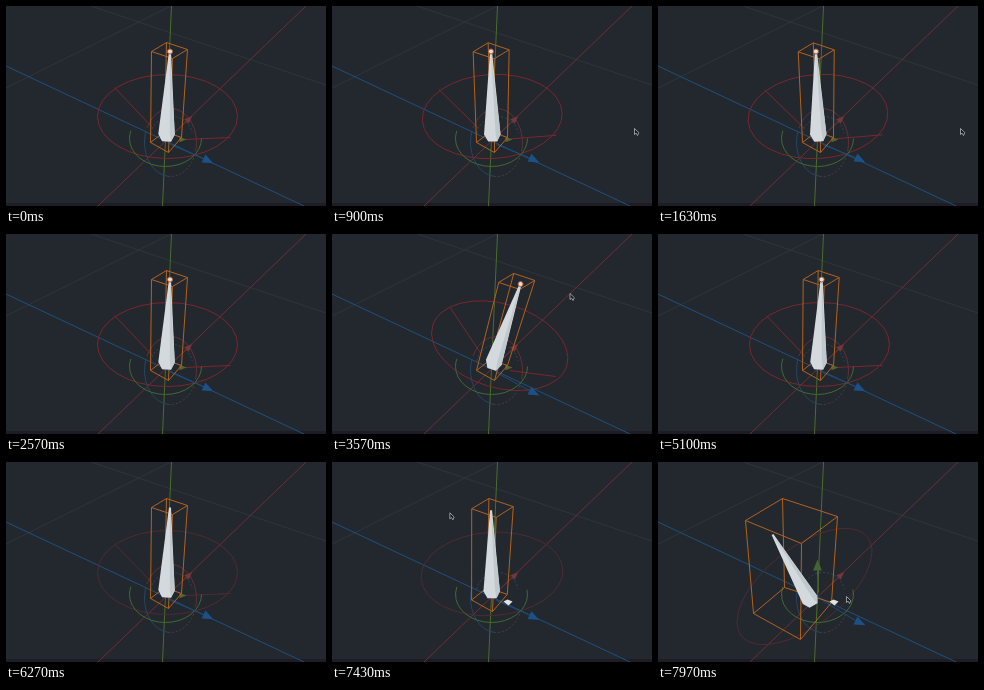
An HTML page with a canvas that plays this animation: 320 by 200 pixels, repeating every 8000 ms.

```html
<!DOCTYPE html>
<html>
<head>
<meta charset="utf-8">
<style>
html, body { margin: 0; width: 100%; height: 100%; overflow: hidden; background: #22282e; }
canvas { display: block; width: 100vw; height: 100vh; }
</style>
</head>
<body>
<canvas id="stage" width="320" height="200"></canvas>
<script>
const ctx = document.getElementById('stage').getContext('2d');
const LOOP = 8000, DRAG = 2730, RELEASE = 4400, DESELECT = 6070, MOVE = 6900, PULL = 7300;
const PIVOT = [160, 132];
const RAD = Math.PI / 180;

// Box corners run left, back, right, front.
const UPRIGHT = {
  tip: [163.5, 45], root: [160, 135],
  top: [[145, 45], [160, 36], [181, 43], [166, 52]],
  bottom: [[144, 136], [158, 125], [175, 131], [162, 146]]
};
const PULLED = {
  tip: [114, 72], root: [155, 143],
  top: [[87, 58], [124, 36], [179, 54], [143, 81]],
  bottom: [[95, 151], [126, 125], [173, 140], [142, 177]]
};

const mix = (a, b, k) =>
  Array.isArray(a) ? a.map((v, i) => mix(v, b[i], k)) : a + (b - a) * k;
const progress = (t, from, to) => Math.min(1, Math.max(0, (t - from) / (to - from)));
const wave = turns => Math.sin(turns * 2 * Math.PI);

// Tilt while dragging: a growing swing that dies out after release.
function swing(t) {
  const amplitude = 19.6 + (t - 3570) * .009;
  const decay = Math.exp(-Math.max(0, t - RELEASE) / 150);
  return -amplitude * decay * wave((t - DRAG) / 1000);
}

function leanAt(t) {
  if (t > DRAG && t < 5230) return swing(t);
  return -4.2 * wave(progress(t, 230, 2570) / 2) - 2 * wave(progress(t, 5230, 6030));
}

function cursorAt(t) {
  if (t > 800 && t < 1880) return [302, 122];
  if (t > DRAG && t < RELEASE + 100) return [160 + 4.7 * swing(t), 59];
  if (t > PULL) {
    const k = progress(t, PULL, 7970);
    return [188 - 75 * wave(k), mix(30, 134, k)];
  }
}

function rotate([x, y], degrees) {
  const c = Math.cos(degrees * RAD), s = Math.sin(degrees * RAD);
  const dx = x - PIVOT[0], dy = y - PIVOT[1];
  return [PIVOT[0] + dx * c - dy * s, PIVOT[1] + dx * s + dy * c];
}

function path(points, close) {
  ctx.beginPath();
  points.forEach(p => ctx.lineTo(...p));
  if (close) ctx.closePath();
}

function line(points, color, width = 1, close = false) {
  path(points, close);
  ctx.strokeStyle = color;
  ctx.lineWidth = width;
  ctx.stroke();
}

function fill(points, color) {
  path(points, true);
  ctx.fillStyle = color;
  ctx.fill();
}

function arc(x, y, rx, ry, color, from = 0, to = 360, tilt = 0) {
  ctx.beginPath();
  ctx.ellipse(x, y, rx, ry, tilt * RAD, from * RAD, to * RAD);
  ctx.strokeStyle = color;
  ctx.lineWidth = 1;
  ctx.stroke();
}

// Triangle whose tip lies a given length ahead of its base.
function arrow([x, y], angle, length, color) {
  const c = Math.cos(angle * RAD), s = Math.sin(angle * RAD), half = length * .4;
  fill([[x + c * length, y + s * length], [x - s * half, y + c * half],
        [x + s * half, y - c * half]], color);
}

function drawGrid() {
  ctx.fillStyle = '#22282e';
  ctx.fillRect(0, 0, 320, 200);
  ctx.fillStyle = '#1e1c24';
  ctx.fillRect(0, 197, 320, 3);
  line([[0, 82], [165, 0]], '#2e353a');
  line([[85, 0], [320, 79]], '#2e353a');
  line([[300, 0], [92, 200]], '#702c34');
  line([[165.5, 0], [156.5, 200]], '#4a6c2c');
  line([[0, 60], [298, 200]], '#1c5080');
}

function drawRing(lean, pull, color) {
  const [x, y] = rotate([161, 110], lean);
  const [cx, cy, rx, ry, tilt] = mix([x, y, 70, 42, lean], [146, 124, 80, 39, -38], pull);
  arc(cx, cy, rx, ry, color, 0, 360, tilt);
  if (pull) return;
  line([rotate([108, 81], lean * .6), rotate([146, 121], lean * .6)], color);
  line([rotate([178, 133], lean * .6), rotate([224, 131], lean * .6)], color);
}

function drawGizmo(drop, moveMode) {
  arc(164, 136, 26, 34, '#234668', 95, 200);
  ctx.setLineDash([2, 2]);
  arc(164, 136, 26, 34, '#533b45', 20, 95);
  arc(165, 130, 21, 20, '#30475d', 190, 350);
  ctx.setLineDash([]);
  if (!moveMode) arc(164, 136, 26, 34, '#632f38', 205, 375);
  arc(159, 132, 36, 28, '#416a30', moveMode ? -10 : 0, 196);

  line([[164, 138], [197, 152 + drop]], '#1d4a78');
  arrow([197, 152 + drop], 26, 11, '#1c5187');
  line([[164, 130], [180, 115]], '#632f38');
  arrow([180, 115], -44, 8, '#74363a');
  if (moveMode) {
    line([[160, 130], [159, 108]], '#4a6c2c');
    arrow([159, 108], -90, 11, '#456431');
  } else {
    arrow([173, 133], 0, 7, '#566530');
  }
}

function drawBox({ top, bottom }) {
  const color = '#b3621f';
  line(top, color, 1, true);
  line(bottom, color, 1, true);
  top.forEach((p, i) => line([p, bottom[i]], color));
}

function drawBone({ tip, root }) {
  const length = Math.hypot(root[0] - tip[0], root[1] - tip[1]);
  const ux = (root[0] - tip[0]) / length, uy = (root[1] - tip[1]) / length;
  const at = (along, side) => {
    const [x, y] = mix(tip, root, along);
    return [x - uy * side, y + ux * side];
  };
  fill([at(0, -1), at(.92, -8), at(1, -4.5), at(1, 4.5), at(.92, 8.5), at(0, 1)], '#d3d9dc');
  fill([tip, at(.92, -8), at(1, -4.5), at(.9, -3)], '#bfc8cd');
}

function drawTip([x, y]) {
  ctx.beginPath();
  ctx.arc(x, y, 2.5, 0, 7);
  ctx.fillStyle = '#e8ddd6';
  ctx.fill();
  ctx.strokeStyle = '#a8583f';
  ctx.lineWidth = 1;
  ctx.stroke();
}

function drawCursor([x, y]) {
  const shape = [[x, y], [x, y + 6], [x + 1.6, y + 4.6], [x + 3, y + 7], [x + 4.3, y + 4.2]];
  fill(shape, '#14181c');
  line(shape, '#c8cccf', .7, true);
}

function poseAt(lean, pull) {
  const tip = rotate(UPRIGHT.tip, lean);
  const dx = tip[0] - UPRIGHT.tip[0] - lean * .2;
  const dy = tip[1] - UPRIGHT.tip[1] - lean * .1;
  const leaning = {
    tip,
    root: rotate(UPRIGHT.root, lean),
    top: UPRIGHT.top.map(([x, y]) => [x + dx, y + dy]),
    bottom: UPRIGHT.bottom
  };
  return Object.fromEntries(Object.keys(leaning).map(
    key => [key, mix(leaning[key], PULLED[key], pull)]));
}

function draw(t) {
  const lean = leanAt(t);
  const k = progress(t, PULL, 7970), pull = k * k * (3 - 2 * k);
  const pose = poseAt(lean, pull);
  const selected = t < DESELECT;
  const cursor = cursorAt(t);

  ctx.setTransform(1, 0, 0, 1, 0, 0);
  drawGrid();
  ctx.translate(.5, .5);
  drawRing(lean, pull, selected ? '#7a272c' : '#522a30');
  drawGizmo(lean * .25 + pull * 6, t >= MOVE);
  drawBox(pose);
  drawBone(pose);
  if (t >= MOVE) fill([[171, 139], [175, 137], [180, 139], [176, 143]], '#e4e3de');
  if (selected) drawTip(pose.tip);
  if (cursor) drawCursor(cursor);
}

function tick() {
  draw(performance.now() % LOOP);
  requestAnimationFrame(tick);
}
tick();
</script>
</body>
</html>
```
